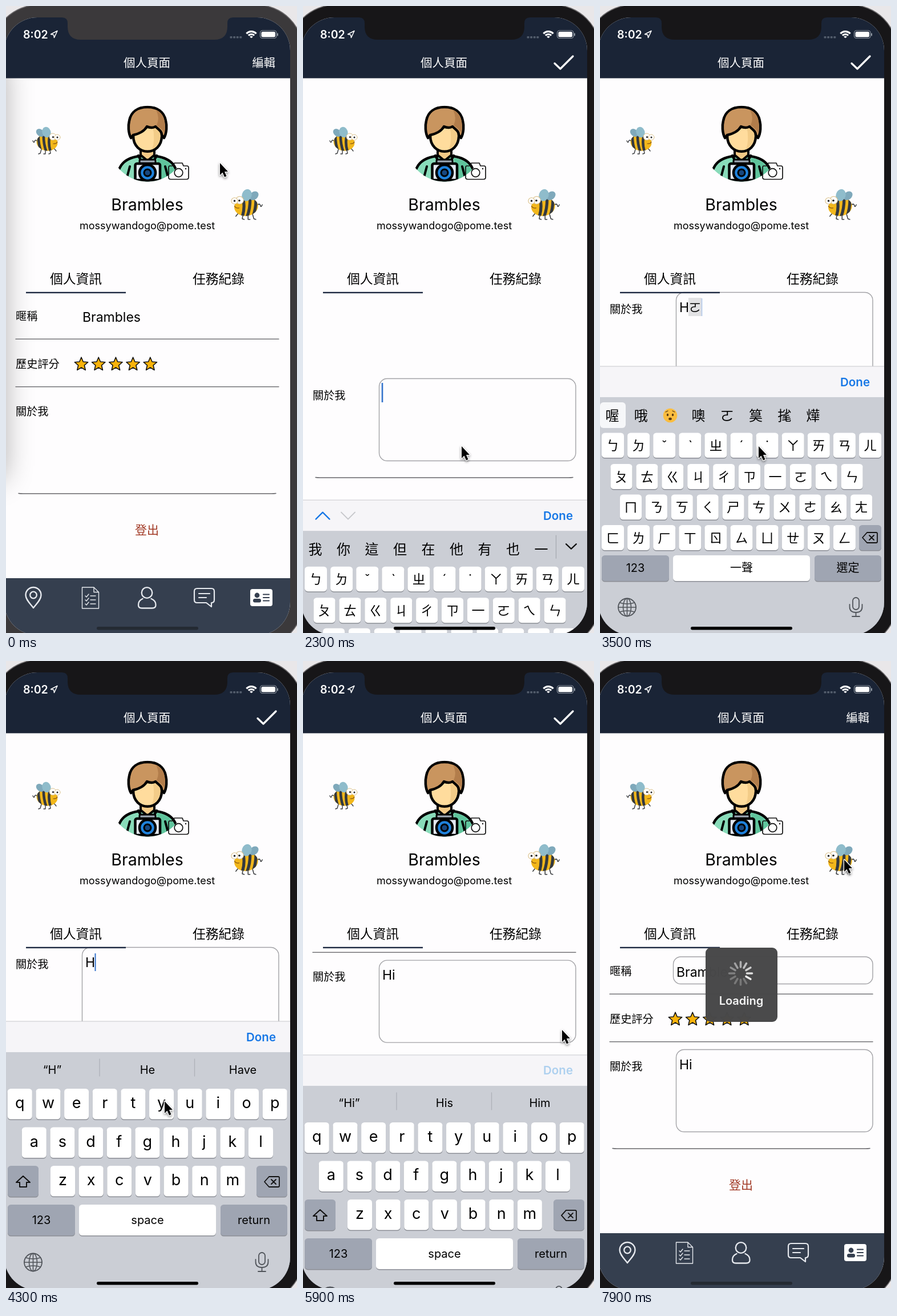
Write an HTML page with a canvas that moves like this. It is 510 px wide and 1098 px high and loops after 8000 ms.

```html
<!DOCTYPE html>
<html lang="zh-Hant">
<head>
<meta charset="utf-8">
<style>
html, body { margin: 0; width: 100%; height: 100%; overflow: hidden; background: #e9e7e9; }
canvas { display: block; width: 510px; height: 1098px; }
</style>
</head>
<body>
<canvas id="stage"></canvas>
<script>
const W = 510, H = 1098, LOOP = 8000;
const canvas = document.getElementById('stage');
const ratio = window.devicePixelRatio || 1;
canvas.width = W * ratio;
canvas.height = H * ratio;
const c = canvas.getContext('2d');

const FONT = 'Inter, "Noto Sans CJK TC", "Noto Sans CJK", sans-serif';
const NAME = 'Brambles', EMAIL = 'mossywandogo@pome.test';
const NAVY = '#1a2436', BLUE = '#1677e6', KEY_GRAY = '#9fa5b2';

// Event times in ms
const FOCUS = 1000, EDIT = 1300, KB_UP = 2200, TYPE_H = 2900, TYPE_O = 3300,
      ERASE = 3800, ENGLISH = 4100, TYPE_I = 4500, DONE = 5800, SAVE = 7400;
const CURSOR = [[0, 374, 274], [200, 374, 274], [900, 449, 95], [1400, 449, 95],
  [1900, 277, 770], [5200, 277, 770], [5700, 453, 645], [6200, 453, 645],
  [6900, 436, 111], [7100, 446, 94], [7400, 446, 94], [7900, 427, 347]];

const clamp = u => Math.max(0, Math.min(1, u));
const smooth = u => u * u * (3 - 2 * u);
const span = (t, start, length) => clamp((t - start) / length);

function text(s, x, y, size, { color = '#000', align = 'left', weight = 400 } = {}) {
  c.font = `${weight} ${size}px ${FONT}`;
  c.textAlign = align;
  c.fillStyle = color;
  c.fillText(s, x, y);
}
// Places CJK text by the vertical middle of its glyphs
const han = (s, x, mid, size, opts) => text(s, x, mid + size * 0.38, size, opts);

function paint(path, fill, stroke, width = 2) {
  if (fill) { c.fillStyle = fill; c.fill(path); }
  if (stroke) { c.strokeStyle = stroke; c.lineWidth = width; c.stroke(path); }
}
const shape = (d, fill, stroke, width) => paint(new Path2D(d), fill, stroke, width);
function box(x, y, w, h, r, fill, stroke, width) {
  const p = new Path2D();
  p.roundRect(x, y, w, h, r);
  paint(p, fill, stroke, width);
}
function oval(x, y, rx, ry, fill, stroke, width, turn = 0) {
  const p = new Path2D();
  p.ellipse(x, y, rx, ry, turn, 0, 7);
  paint(p, fill, stroke, width);
}
const disc = (x, y, r, fill, stroke, width) => oval(x, y, r, r, fill, stroke, width);
function group(draw) { c.save(); draw(); c.restore(); }

function bee(x, y, sx, sy) {
  group(() => {
    c.translate(x, y);
    c.scale(sx, sy);
    shape('M-16 1Q-20 -3 -21 1T-24 0M-9 15L-11 22L-14 23M-2 17L-2 23L-5 23M6 16L7 22L4 23M13 13L17 18', null, '#3b3d40', 1.4);
    const body = new Path2D();
    body.ellipse(1, 3, 18.5, 14.5, 0.12, 0, 7);
    paint(body, '#f2b71b');
    group(() => {
      c.clip(body);
      shape('M-14 -12Q-15 5 -9 20M-5 -14Q-6 5 0 20M5 -6Q3 7 7 19', null, '#34393f', 4.6);
    });
    oval(-11, -14, 8, 6, '#7fa9bb', null, 0, 0.7);
    oval(0, -15, 7.5, 9.5, '#8fbccb', null, 0, -0.3);
    disc(11, -7, 6, '#fff', '#d9bd83', 0.9);
    disc(19, -6, 5, '#fff', '#d9bd83', 0.9);
    disc(11.5, -6.5, 1.6, '#222');
    disc(19, -6, 1.5, '#222');
    shape('M12 5Q17 6 19 2', null, '#8a5614', 1.2);
  });
}

function avatar() {
  group(() => {
    const crop = new Path2D();
    crop.arc(248, 241, 66.5, 0, 7);
    c.clip(crop);
    shape('M194 316C193 284 203 267 233 263H263C293 267 303 284 302 316Z', '#88dbb9', '#000', 4.5);
    shape('M264 266C288 270 299 282 299 310H274Z', '#5fc49c');
    shape('M217 281L212 300M279 281L284 300', null, '#000', 4);
    shape('M236 246V261L248 271L260 261V246Z', '#f3ca87', '#000', 4);
    shape('M232 262L240 277M264 262L256 277', null, '#000', 4.5);
    shape('M223 212V227C223 264 273 264 273 227V212Z', '#ffdc9d', '#000', 4.5);
    shape('M257 210H270.500V228Q269 244 256 251Q262 235 257 210Z', '#f3cc88');
    shape('M219 231C214 222 214 209 216 201C219 185 231 177 248 177C265 177 277 185 280 201C282 209 282 222 277 231L273 226C273 219 268 217 262 211Q256 215 247 211Q241 222 223 226Z', '#c9955f', '#000', 4.5);
    shape('M263 182C278 189 281 204 277 222Q274 215 264 209Q270 196 263 182Z', '#b27d4b');
    box(234, 269, 28, 9, 2, '#9ba6b2', '#000', 3);
    box(226.5, 276, 43.5, 29, 3, '#e2e8f1', '#000', 4.5);
    disc(248, 292, 14, '#1f82dc', '#000', 4.5);
    disc(248, 292, 6, '#17477f', '#000', 3);
  });
  shape('M287 280H293L295 275H309L311 280H317Q320 280 320 283V300Q320 303.500 316 303.500H289Q285 303.500 285 300V283Q285 280 287 280Z', null, '#111', 1.7);
  disc(302.5, 292, 7.3, '#fff', '#111', 1.7);
  disc(315, 285, 1.2, '#111');
}

function star(x, y) {
  const p = new Path2D();
  for (let i = 0; i < 10; i++) {
    const a = i * Math.PI / 5 - Math.PI / 2, r = i % 2 ? 5.6 : 12.3;
    p.lineTo(x + r * Math.cos(a), y + r * Math.sin(a));
  }
  p.closePath();
  paint(p, '#f9b30b', '#111', 1.6);
}

function statusBar() {
  text('8:02', 30, 57, 19.5, { color: '#fff', weight: 600 });
  shape('M78.500 49.500L90 43.500L84.500 55.500L83.500 50.500Z', null, '#fff', 1.5);
  for (let i = 0; i < 4; i++) box(392.5 + i * 5.6, 53, 4, 3.5, 1, '#535d6c');
  group(() => {
    c.lineCap = 'butt';
    for (const r of [2.2, 7, 11.8]) {
      const p = new Path2D();
      p.arc(430, 56.5, r, -Math.PI * 0.76, -Math.PI * 0.24);
      paint(p, null, '#fff', 3.2);
    }
  });
  box(445.5, 43, 28.5, 13.5, 4, null, '#8d95a0', 1.2);
  box(447.5, 45, 24.5, 9.5, 2.5, '#fff');
  box(475, 47.5, 2, 5, 1, '#8d95a0');
}

function header(editing) {
  c.fillStyle = NAVY;
  c.fillRect(0, 0, W, 126.5);
  statusBar();
  han('個人頁面', 247, 99.5, 20.5, { color: '#fff', align: 'center', weight: 500 });
  if (editing) shape('M441 100.500L451 110L473 88', null, '#fff', 3.3);
  else han('編輯', 472, 99.5, 20.3, { color: '#fff', align: 'right' });
}

function profile() {
  bee(71, 236, 1, 1);
  bee(422, 348, -1.13, 1.12);
  avatar();
  text(NAME, 247.5, 357.5, 28.5, { align: 'center' });
  text(EMAIL, 247.5, 391, 18, { align: 'center' });
  han('個人資訊', 122.5, 477, 22.8, { align: 'center' });
  han('任務紀錄', 372.5, 477, 22.8, { align: 'center' });
}

function form(t, shift, boxed) {
  const rule = y => shape(`M17 ${y}H478`, null, '#747478', 1.5);
  group(() => {
    c.beginPath();
    c.rect(0, 500, W, H);
    c.clip();
    c.translate(0, -shift);
    if (t < KB_UP || t >= DONE) {
      han('暱稱', 17, 543, 19.2);
      if (boxed) box(128.5, 518, 349.5, 47.5, 13, null, '#a2a2a6', 1.4);
      text(NAME, 134, 552.5, 23);
      rule(583.3);
      han('歷史評分', 17, 626.5, 19.2);
      for (let i = 0; i < 5; i++) star(132 + i * 30.2, 627.5);
      rule(666.7);
    }
    han('關於我', 17, 709.5, 19.2);
    if (boxed) {
      box(133.5, 680.5, 344.5, 144, 14, null, '#a2a2a6', 1.4);
      message(t);
    }
    shape('M22 853.500Q25 854 30 854H465Q470 854 473 853.500', null, '#66666a', 1.5);
    han('登出', 247, 917, 21, { color: '#a23a26', align: 'center' });
  });
  c.fillStyle = '#1d2941';
  c.fillRect(35, 500.7, 175, 2.4);
}

function message(t) {
  const composing = t >= TYPE_O && t < ERASE;
  const typed = t < TYPE_H ? '' : t < TYPE_I ? 'H' : 'Hi';
  if (composing) {
    c.fillStyle = '#e2e2e4';
    c.fillRect(155, 690, 23, 32);
    han('ㄛ', 156, 706, 21);
  }
  text(typed, 139, 714.5, 23);
  if (t < KB_UP || t >= DONE) return;
  const x = composing ? 178.5 : typed === 'Hi' ? 161.5 : typed ? 156.5 : 139;
  c.globalAlpha = composing ? 0.3 : clamp(0.75 + Math.cos((t - 2300) * Math.PI / 500));
  if (t >= TYPE_I) c.globalAlpha = Math.max(c.globalAlpha, 0.4);
  c.fillStyle = '#3474cc';
  if (typed) c.fillRect(x - 1, 691, 2, 31);
  else c.fillRect(x - 1.3, 688, 2.6, 34);
  c.globalAlpha = 1;
}

function tabBar() {
  c.fillStyle = '#353f4f';
  c.fillRect(0, 1002, W, 100);
  const line = '#e6e9ee';
  shape('M48 1054C43 1047 34.500 1040 34.500 1031.500A13.500 13.500 0 0 1 61.500 1031.500C61.500 1040 53 1047 48 1054Z', null, line, 2.4);
  disc(48, 1031.5, 5.8, null, line, 2.3);
  shape('M133.500 1018H154L162.500 1026.500V1055H133.500ZM154 1018V1026.500H162.500', null, line, 1.4);
  for (let i = 0; i < 3; i++) {
    const y = 1033 + i * 7;
    shape(`M139 ${y}L141 ${y + 2}L145 ${y - 3}M148 ${y}H157`, null, line, 1.4);
  }
  disc(247, 1027.5, 9.3, null, line, 2.3);
  shape('M239.500 1038Q232 1041 232 1049Q232 1054.500 238 1054.500H256Q262.500 1054.500 262.500 1049Q262.500 1041 254.500 1038', null, line, 2.3);
  shape('M335 1020H360Q365 1020 365 1025V1040Q365 1045 360 1045V1052L351 1045H335Q330 1045 330 1040V1025Q330 1020 335 1020Z', null, line, 2.2);
  shape('M338 1029H357M338 1036H351', null, line, 2.2);
  box(428, 1021, 39, 30, 4, '#fff');
  disc(440, 1032, 4.4, '#353f4f');
  box(433, 1038, 14, 6.5, 3, '#353f4f');
  shape('M451 1030.500H461M451 1036H461M451 1041.500H461', null, '#353f4f', 2.2);
}

function key(x, y, w, h, label, size, gray) {
  box(x, y + 1.5, w, h, 5.5, '#8b8e95');
  box(x, y, w, h, 5.5, gray ? KEY_GRAY : '#fff');
  if (label) text(label, x + w / 2, y + h / 2 + size * 0.34, size, { align: 'center' });
}
function keyRow(labels, first, pitch, y, w, h, size, lift = 0) {
  [...labels].forEach((s, i) => {
    const mid = first + i * pitch;
    key(mid - w / 2, y, w, h);
    text(s, mid, y + h / 2 + size * 0.38 - lift, size, { align: 'center' });
  });
}
function backspace(x, y) {
  shape(`M${x - 13} ${y}L${x - 5} ${y - 9}H${x + 11}Q${x + 13} ${y - 9} ${x + 13} ${y - 7}V${y + 7}Q${x + 13} ${y + 9} ${x + 11} ${y + 9}H${x - 5}ZM${x - 1} ${y - 4}L${x + 7} ${y + 4}M${x + 7} ${y - 4}L${x - 1} ${y + 4}`, null, '#111', 1.8);
}

function zhuyinKeys(t) {
  if (t >= TYPE_O && t < ERASE) {
    box(0, 694, 45, 45, 6, '#f6f7f9');
    ['喔', '哦', '', '噢', 'ㄛ', '筽', '毮', '燁'].forEach((s, i) =>
      han(s, 21.5 + i * 50.3, 717, 24, { align: 'center' }));
    disc(123, 717, 12.3, '#fabd3f');
    oval(118.5, 716, 1.7, 2.2, '#5d3c14');
    oval(127.5, 716, 1.7, 2.2, '#5d3c14');
    oval(123, 723, 2.8, 2.2, '#5d3c14');
    shape('M115 711L119 709M127 709L131 711', null, '#5d3c14', 1.2);
  } else {
    [...'我你這但在他有也一'].forEach((s, i) =>
      han(s, 21.5 + i * 49.5, 717, 24, { align: 'center' }));
    shape('M443.500 693V733', null, '#a5a9b0', 1.2);
    shape('M461 708L470 716.500L479 708', null, '#111', 2.2);
  }
  keyRow('ㄅㄉˇˋㄓˊ˙ㄚㄞㄢㄦ', 22.5, 45.1, 747.5, 39, 43.5, 23);
  keyRow('ㄆㄊㄍㄐㄔㄗ一ㄛㄟㄣ', 37.5, 44.9, 802, 38, 44, 23);
  keyRow('ㄇㄋㄎㄑㄕㄘㄨㄜㄠㄤ', 54, 44.9, 855.5, 38, 44, 23);
  keyRow('ㄈㄌㄏㄒㄖㄙㄩㄝㄡㄥ', 22.5, 45.1, 909, 39, 44, 23);
  key(454, 909, 39, 44, '', 0, true);
  backspace(473, 931);
  bottomKeys(962, 45, '一聲', '選定');
}

function latinKeys(t) {
  const words = t < TYPE_I ? ['“H”', 'He', 'Have'] : ['“Hi”', 'His', 'Him'];
  words.forEach((s, i) => text(s, 81 + i * 167, 722.5, 20, { align: 'center' }));
  shape('M164 697V727M330.500 697V727', null, '#aeb1b8', 1.3);
  keyRow('qwertyuiop', 24.3, 49.65, 749, 43, 53.5, 27, 3);
  keyRow('asdfghjkl', 49.3, 49.65, 816.5, 43, 53.5, 27, 3);
  keyRow('zxcvbnm', 99.5, 49.65, 884, 43, 53.5, 27, 3);
  key(3, 884, 54, 54, '', 0, true);
  shape('M30 902L42 913H36V921H24V913H18Z', null, '#111', 2);
  key(439, 884, 54, 54, '', 0, true);
  backspace(466, 912);
  bottomKeys(952, 54, 'space', 'return');
}

function bottomKeys(y, h, space, enter) {
  key(3, y, 118, h, '123', 20, true);
  key(128, y, 240, h, space, 20);
  key(376, y, 117, h, enter, 20, true);
}

function keyboard(t, drop) {
  group(() => {
    c.translate(0, drop);
    c.fillStyle = '#f6f5f8';
    c.fillRect(0, 631, W, 54);
    c.fillStyle = '#c9c9cd';
    c.fillRect(0, 630.5, W, 1);
    if (t < KB_UP + 300) {
      shape('M22.500 664.500L34.500 652.500L46.500 664.500', null, BLUE, 2.3);
      shape('M67 652.500L79 664.500L91 652.500', null, '#c6c7cb', 2);
    }
    const pressed = t >= DONE && t < DONE + 300;
    text('Done', 473, 665.5, 20.5, { align: 'right', weight: 600, color: pressed ? '#add0ef' : BLUE });
    c.fillStyle = '#cbced5';
    c.fillRect(0, 685, W, 500);
    if (t < ENGLISH) zhuyinKeys(t); else latinKeys(t);
    const ink = '#50545a';
    disc(47.5, 1053, 15.5, null, ink, 1.8);
    oval(47.5, 1053, 7, 15.5, null, ink, 1.6);
    shape('M32 1053H63M47.500 1037.500V1068.500M35 1045Q47.500 1049 60 1045M35 1061Q47.500 1057 60 1061', null, ink, 1.6);
    box(443, 1036, 11, 21, 5.5, null, ink, 1.8);
    shape('M437.500 1048V1052Q437.500 1062 448.500 1062Q459.500 1062 459.500 1052V1048M448.500 1062V1069M442 1069H455', null, ink, 1.8);
  });
}

function loading(t) {
  box(185, 502, 126, 130, 9, 'rgba(72,72,73,.99)');
  const lead = Math.floor((t - 7900) / 100) + 4;
  for (let i = 0; i < 12; i++) {
    const a = i * Math.PI / 6 - Math.PI / 2, x = Math.cos(a), y = Math.sin(a);
    const age = ((lead - i) % 12 + 12) % 12;
    shape(`M${246.5 + 11 * x} ${547 + 11 * y}L${246.5 + 20 * x} ${547 + 20 * y}`, null,
      `rgba(255,255,255,${Math.max(0.25, 0.9 - age * 0.085)})`, 3.6);
  }
  text('Loading', 247.5, 602, 20, { color: '#f4f4f4', align: 'center', weight: 600 });
}

function pointer(t) {
  const i = Math.max(1, CURSOR.findIndex(k => k[0] >= t));
  const [t0, x0, y0] = CURSOR[i - 1], [t1, x1, y1] = CURSOR[i];
  const u = smooth(span(t, t0, t1 - t0));
  group(() => {
    c.translate(x0 + (x1 - x0) * u, y0 + (y1 - y0) * u);
    c.shadowColor = 'rgba(0,0,0,.35)';
    c.shadowBlur = 4;
    c.shadowOffsetY = 2;
    const arrow = new Path2D('M1 1V22L5.500 17.500L9 25.500L12.500 24L9 16H15Z');
    paint(arrow, '#fff', '#fff', 2.6);
    c.shadowColor = 'transparent';
    paint(arrow, '#000');
  });
}

function edgeShadow() {
  group(() => {
    c.shadowColor = 'rgba(0,0,0,.32)';
    c.shadowBlur = 50;
    c.fillRect(-100, 100, 98, 728);
  });
}

function draw(t) {
  const editing = t >= EDIT && t < SAVE;
  const fall = smooth(span(t, DONE, 450));
  const rise = span(t, KB_UP, 400);
  const shown = (1 - (1 - rise) ** 2.4) * (1 - fall);
  const bezel = t < FOCUS ? '#3b393b' : '#171618';

  c.setTransform(ratio, 0, 0, ratio, 0, 0);
  c.lineCap = c.lineJoin = 'round';
  c.fillStyle = '#e9e7e9';
  c.fillRect(0, 0, W, H);
  box(-25, -2, 546, 1126, 82, bezel, '#6c6a6c', 1.5);

  group(() => {
    const screen = new Path2D();
    screen.roundRect(-3, 20, 501, 1082, 58);
    c.clip(screen);
    c.fillStyle = '#fefdfe';
    c.fillRect(0, 0, W, H);
    if (t < EDIT) edgeShadow();
    profile();
    form(t, 179 * smooth(rise) * (1 - fall), t >= EDIT);
    header(editing);
    tabBar();
    if (shown > 0) keyboard(t, 467 * (1 - shown));
    box(159, 1087, 178, 5.5, 2.7, shown > 0.05 ? '#000' : '#242a33');
    if (t >= SAVE) loading(t);
  });

  shape('M98 19V20Q108 20 108 30V36Q108 59 131 59H365Q388 59 388 36V30Q388 20 398 20V19Z', bezel);
  pointer(t);
}

let start;
function tick(now) {
  start ??= now;
  draw(Math.floor((now - start) % LOOP / 100) * 100);
  requestAnimationFrame(tick);
}
draw(0);
requestAnimationFrame(tick);
</script>
</body>
</html>
```
